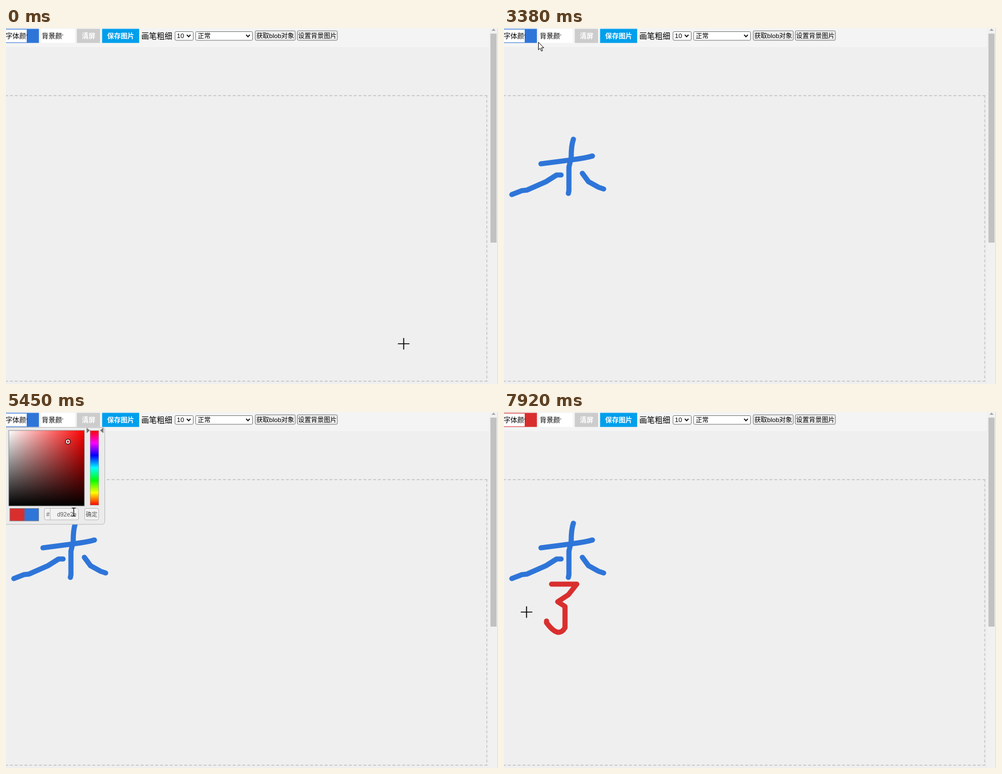
Write an HTML page that moves like this. It is 879x637 px and loops after 8 s.

```html
<!DOCTYPE html>
<html lang="zh-CN">
<head>
<meta charset="utf-8">
<title>画板</title>
<style>
html, body { margin: 0; width: 100%; height: 100%; overflow: hidden; background: #efefef; }
svg { display: block; width: 879px; height: 637px; font-family: "Liberation Sans", "Noto Sans CJK SC", "Noto Sans CJK", sans-serif; }
.t12 { font-size: 12.1px; }
.t11 { font-size: 11.5px; }
.t10 { font-size: 10.4px; fill: #555; }
.bold { font-weight: bold; fill: #fff; }
.mid { text-anchor: middle; }
.dash { fill: none; stroke: #ccc; stroke-width: 1.8; stroke-dasharray: 5.2 3.45; }
.box { fill: #fff; stroke: #767676; }
.btn { fill: #efefef; stroke: #767676; }
.chev { fill: none; stroke: #111; stroke-width: 1.8; }
.pen { fill: none; stroke-width: 9.2; stroke-linecap: round; stroke-linejoin: round; }
.field { fill: #f3f3f3; stroke: #bbb; }
.sv { x: 5px; y: 33px; width: 135px; height: 135px; }
</style>
</head>
<body>
<svg viewBox="0 0 879 637">
  <defs>
    <linearGradient id="white"><stop stop-color="#fff"/><stop offset="1" stop-color="#fff" stop-opacity="0"/></linearGradient>
    <linearGradient id="black" x2="0" y2="1"><stop stop-opacity="0"/><stop offset="1"/></linearGradient>
    <linearGradient id="rainbow" x2="0" y2="1"></linearGradient>
    <clipPath id="clipA"><path d="M0 0H38V34H0z"/></clipPath>
    <clipPath id="clipB"><path d="M63 0H102V34H63z"/></clipPath>
  </defs>

  <rect width="879" height="637" fill="#efefef"/>
  <rect width="863" height="34" fill="#f4f4f4"/>
  <path class="dash" d="M860 121H0"/>
  <path class="dash" d="M859 120V632"/>
  <path class="dash" d="M860 632H0"/>

  <rect x="863" width="16" height="637" fill="#f1f1f1"/>
  <rect x="865.5" y="10" width="11" height="374" fill="#c1c1c1"/>
  <path d="M867.5 5L871 1L874.5 5z" fill="#a3a3a3"/>
  <rect x="878" width="1" height="637" fill="#dcdcdc"/>

  <rect id="inputEdge" x="-5" y="1.5" width="63.8" height="25.2"/>
  <rect y="2.7" width="37" height="23" fill="#fff"/>
  <text class="t12" x="-.5" y="18.7" clip-path="url(#clipA)">字体颜色</text>
  <rect x="63" y="1.5" width="60" height="25.2" fill="#fff"/>
  <text class="t12" x="63.8" y="18.7" clip-path="url(#clipB)">背景颜色</text>

  <rect x="126.5" y="1.5" width="41.5" height="25.2" fill="#ccc"/>
  <text class="t12 bold mid" x="147.5" y="18.9">清屏</text>
  <rect x="171.7" y="1.5" width="66.2" height="25.2" fill="#009fec"/>
  <text class="t12 bold mid" x="205" y="18.9">保存图片</text>
  <text x="241.8" y="18.6" font-size="13.8">画笔粗细</text>

  <rect class="box" x="302" y="6.5" width="32.5" height="15.5" rx="2"/>
  <text class="t11" x="305.3" y="18.2">10</text>
  <path class="chev" d="M323 12.2l3.3 3.4l3.3-3.4"/>
  <rect class="box" x="338.8" y="6.5" width="101.7" height="15.5" rx="2"/>
  <text class="t11" x="342.5" y="18.2">正常</text>
  <path class="chev" d="M429 12.2l3.3 3.4l3.3-3.4"/>
  <rect class="btn" x="445.3" y="5" width="71.5" height="17" rx="2"/>
  <text class="t11 mid" x="481" y="18">获取blob对象</text>
  <rect class="btn" x="520.5" y="5" width="71.5" height="17" rx="2"/>
  <text class="t11 mid" x="556.3" y="18">设置背景图片</text>

  <g id="ink"></g>

  <g id="picker">
    <rect x="-8" y="27.5" width="184.5" height="173.5" rx="4.5" fill="#ebebeb" stroke="#bbb"/>
    <rect class="sv" id="tone"/>
    <rect class="sv" fill="url(#white)"/>
    <rect class="sv" fill="url(#black)"/>
    <rect class="sv" fill="none" stroke="#777" stroke-width=".8"/>
    <g fill="none" stroke-width="1.5">
      <circle cx="110.6" cy="53" r="4.2" stroke="#000"/>
      <circle cx="110.6" cy="53" r="3" stroke="#fff"/>
    </g>
    <rect x="150.3" y="33.3" width="15.4" height="133.4" fill="url(#rainbow)" stroke="#888" stroke-width=".6"/>
    <path id="marks" d="M144 -4.8L150 0L144 4.8zM174 -4.8L168 0L174 4.8z" fill="#777"/>
    <rect id="fresh" x="7" y="172.5" width="26" height="22.5"/>
    <rect x="33" y="172.5" width="25.5" height="22.5" fill="#2e75d9"/>
    <rect x="6.8" y="172.5" width="51.7" height="22.5" fill="none" stroke="#888" stroke-width=".9"/>
    <rect class="field" x="68.5" y="172.5" width="61" height="20.5" rx="2.5"/>
    <path d="M79 173V193" stroke="#bbb"/>
    <text class="t10" x="72" y="187">#</text>
    <text class="t10" id="hex" x="126" y="187" text-anchor="end"></text>
    <rect class="field" x="140.5" y="172.5" width="25" height="20.5" rx="2.5"/>
    <text class="t10 mid" x="153" y="187">确定</text>
  </g>

  <g id="cursor">
    <path id="cross" d="M-10.3 0H10.3M0 -10.3V10.3" stroke="#000" stroke-width="1.7"/>
    <path id="arrow" d="M.5 .5V14L3.6 11.2L5.8 16.3L8 15.4L5.8 10.4H10.2z" fill="#fff" stroke="#000" stroke-width=".95"/>
    <path id="beam" d="M-3.4 -7.2H3.4M0 -7.2V7.2M-3.4 7.2H3.4" stroke="#000" stroke-width="1.2"/>
    <path id="resize" d="M0 -9.5L4 -5H1V5H4L0 9.5L-4 5H-1V-5H-4z" fill="#fff" stroke="#000" stroke-width=".8"/>
    <path id="hand" d="M-1.5 0Q0 -1.5 1.3 0V5.5L8 7Q9.5 8 9 11L7.5 16H.5L-4.8 9.5Q-4 7.5 -1.5 9.5z" fill="#fff" stroke="#000"/>
    <circle id="glow" r="10.4" fill="#fffa00" opacity=".5"/>
  </g>
</svg>
<script>
const $ = id => document.getElementById(id);
const svgEl = (name, parent) => parent.appendChild(document.createElementNS('http://www.w3.org/2000/svg', name));
const show = (el, on) => { el.style.display = on ? 'inline' : 'none'; };
const clamp = (v, low = 0, high = 1) => Math.min(high, Math.max(low, v));

const BLUE = '#2e75d9', RED = '#d92e2e';
const FPS = 13, STEPS = 104, LAG = 0.6, OPEN = 49, CLOSE = 75;

// A leg moves the pointer along a path between two steps; with a colour it leaves ink
function leg(from, to, d, color) {
  const el = svgEl('path', $('ink'));
  el.setAttribute('d', d);
  el.setAttribute('class', 'pen');
  el.setAttribute('stroke', color || 'none');
  const len = el.getTotalLength();
  const progress = n => clamp((n - from) / (to - from));
  const at = n => el.getPointAtLength(progress(n) * len);
  return { from, to, el, len, color, progress, at };
}

const drag = leg(57, 61, 'M157 86V30');
const legs = [
  leg(0, 10, 'M710.5 565Q150 -155 66 243'),
  leg(10, 15, 'M66 243Q96 239 120 236T158 229', BLUE),
  leg(16.5, 19, 'M124 199Q120 210 120 232L116 249V291L115 296', BLUE),
  leg(24, 29, 'M102 263H94L75 275L41 290L32 291L14 298', BLUE),
  leg(34, 37, 'M140 260L151 275L169 285L178 288', BLUE),
  leg(38, 44, 'M178 288L61 25'),
  leg(47, OPEN, 'M31 16h.1'),
  drag,
  leg(65, 69, 'M157 60L124 238'),
  leg(71, 73, 'M121 179L153 183'),
  leg(CLOSE, 81, 'M153 183L94.5 303.5'),
  leg(83, 85, 'M78 334L73 322'),
  leg(88, 101.5, 'M85 308H130L115 327L96 339.5L109 348V386Q97 406 76 377V374', RED),
  leg(103, STEPS, 'M40.3 358h.1')
];

// On a leg follow it; between legs go straight to the next one
function pointer(n) {
  const i = legs.findIndex(l => n <= l.to);
  const next = legs[i];
  if (n >= next.from) return next.at(n);
  const last = legs[i - 1], p = (n - last.to) / (next.from - last.to);
  const a = last.at(n), b = next.at(n);
  return { x: a.x + (b.x - a.x) * p, y: a.y + (b.y - a.y) * p };
}

function pointerKind(open, x, y) {
  if (open && x < 177 && y > 27 && y < 201) {
    if (y < 168) return x >= 150 && x <= 166 ? 'resize' : x >= 5 && x <= 140 ? 'cross' : 'arrow';
    if (y < 172 || y > 193) return 'arrow';
    return x > 68 && x < 131 ? 'beam' : x >= 140 && x < 167 ? 'hand' : 'arrow';
  }
  if (y < 27 && x < 59) return 'beam';
  return y < 120 ? 'arrow' : 'cross';
}

// Channels are the same ramp, a third of the wheel apart
function hueColor(h, low, high) {
  return '#' + [0, 240, 120].map(offset => {
    const d = Math.abs(((h + offset) % 360 + 180) % 360 - 180);
    const v = Math.round(low + (high - low) * clamp(2 - d / 60));
    return v.toString(16).padStart(2, '0');
  }).join('');
}

for (let i = 0; i <= 12; i++) {
  const stop = svgEl('stop', $('rainbow'));
  stop.setAttribute('offset', i / 12);
  stop.setAttribute('stop-color', hueColor(360 - i * 30, 0, 255));
}

function drawPicker(n) {
  const y = clamp(drag.at(n).y + 3, 33, 87);
  const hue = 360 * (1 - (y - 33) / 134);
  const picked = hueColor(hue, 46, 217);
  $('tone').setAttribute('fill', hueColor(hue, 0, 255));
  $('fresh').setAttribute('fill', picked);
  $('hex').textContent = picked.slice(1);
  $('marks').setAttribute('transform', `translate(0 ${y})`);
}

function draw(n) {
  const open = n >= OPEN && n < CLOSE;
  const { x, y } = pointer(n);
  const current = legs.find(l => n >= l.from && n <= l.to && (l.color || l === drag));

  for (const l of legs) {
    const inked = n > l.to ? 1 : l.progress(n - LAG);
    show(l.el, n > l.from);
    l.el.setAttribute('stroke-dasharray', `${Math.max(0.01, inked * l.len)} 999`);
  }

  show($('picker'), open);
  if (open) drawPicker(n);
  $('inputEdge').setAttribute('fill', n < CLOSE ? BLUE : RED);

  const kind = pointerKind(open, x, y);
  for (const id of ['cross', 'arrow', 'beam', 'resize', 'hand']) show($(id), id === kind);
  show($('glow'), current || n === OPEN || n === CLOSE);
  $('cursor').setAttribute('transform', `translate(${x} ${y})`);
}

const start = performance.now();
function tick() {
  const t = (performance.now() - start) % 8000;
  draw(Math.min(STEPS - 1, Math.floor((t + 12) * FPS / 1000)));
  requestAnimationFrame(tick);
}
tick();
</script>
</body>
</html>
```
